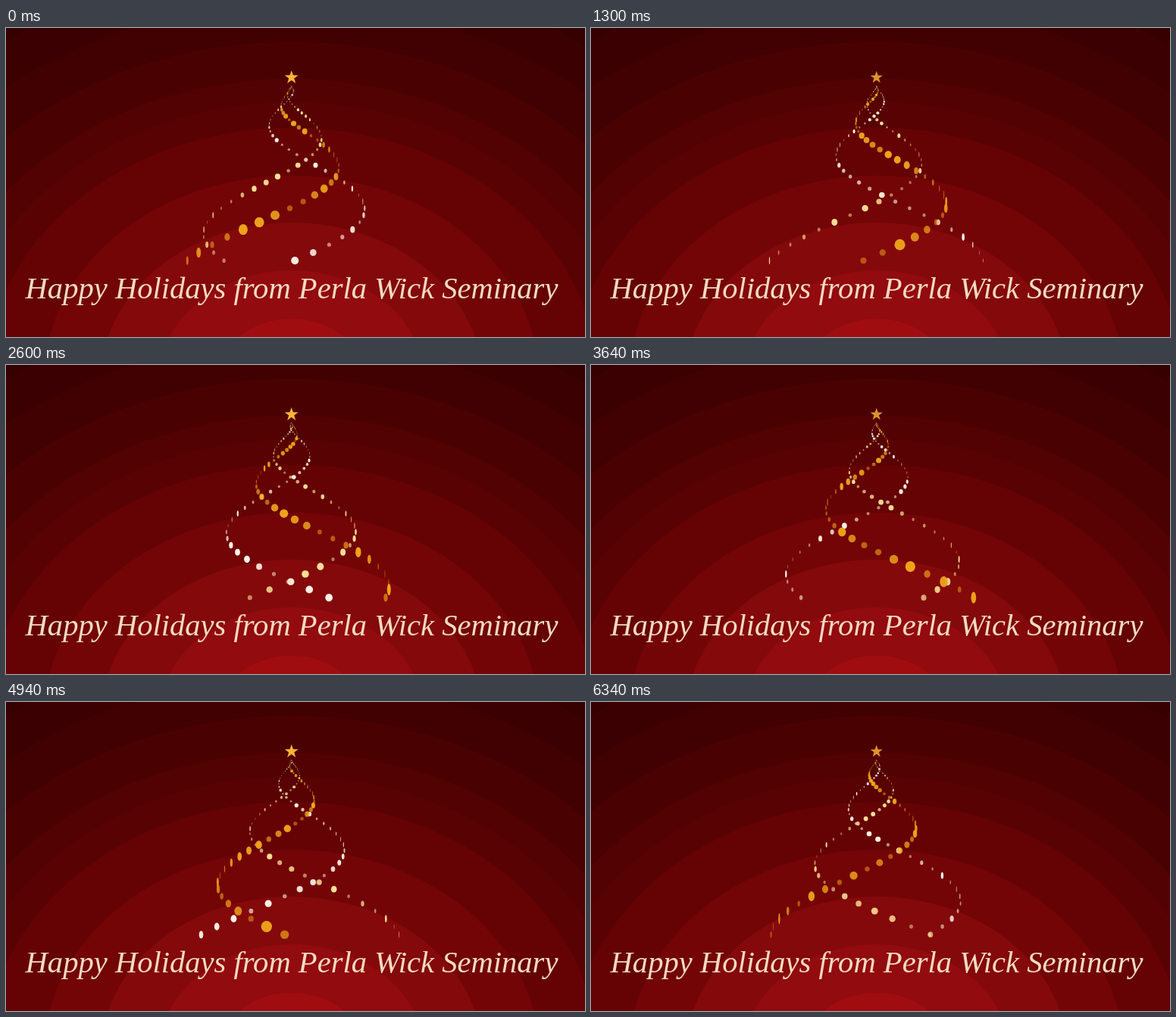
Animation, 764 px wide and 408 px high, one loop 6.44 s. Source, as an HTML page with a canvas:

```html
<!DOCTYPE html>
<html lang="en">
<head>
<meta charset="utf-8">
<title>Happy Holidays</title>
<style>
  html, body { margin: 0; width: 100%; height: 100%; overflow: hidden; background: #360000; }
  svg, canvas { position: absolute; left: 0; top: 0; width: 764px; height: 408px; }
  text { font: italic 40.6px "Liberation Serif", "Times New Roman", serif; fill: #f3dac4; }
</style>
</head>
<body>
<svg viewBox="0 0 764 408">
  <g id="rings"></g>
  <text x="377" y="357" text-anchor="middle">Happy Holidays from Perla Wick Seminary</text>
</svg>
<canvas width="764" height="408"></canvas>
<script>
const LOOP = 6440, STEPS = 55, STEP_SECONDS = 0.1174;
const CENTER = 376.7, TOP = 76, LAST = 43;
const ctx = document.querySelector('canvas').getContext('2d');

// Background glow: vertical radius and colour of each band, outermost first
const bands = [
  [545, '#3b0001'], [497, '#410001'], [447, '#4a0102'], [398, '#520203'], [367, '#590203'],
  [333, '#650304'], [270, '#730506'], [208, '#84090b'], [145, '#920b0e'], [81, '#a00d11']
];
document.getElementById('rings').innerHTML = bands.map(([r, color]) =>
  `<ellipse cx="${CENTER}" cy="465" rx="${r * 1.21}" ry="${r}" fill="${color}"/>`).join('');

// Angles are measured at the lowest dot; each strand turns at its own speed
const strands = [
  { color: '#fff6ea', angle: 3.11, speed: 1.067, size: 0.122 },
  { color: '#f9df96', angle: -0.675, speed: 0.802, size: 0.122 },
  { color: '#eda31c', angle: -1.84, speed: 0.914, size: 0.182 }
];

function random(seed) {
  const v = Math.sin(seed * 127.1 + 3.7) * 43758.5453;
  return v - Math.floor(v);
}

function drawStrand({ color, angle, speed, size }, index, t) {
  ctx.fillStyle = color;
  for (let n = 1; n <= LAST; n++) {
    const k = LAST - n;
    const a = angle - speed * t - 0.18 * k - 0.0004 * k * k;
    const seed = index * 50 + n;
    const glow = 0.5 + 0.5 * Math.sin(random(seed) * 6.283 + t * (2 + 2 * random(seed + 500)));
    const r = n * size * (0.52 + 0.48 * glow);
    ctx.globalAlpha = 0.5 + 0.5 * glow;
    ctx.beginPath();
    ctx.ellipse(CENTER + 0.0771 * n * n * Math.sin(a), TOP + n * n / 8,
      Math.max(0.35, r * Math.abs(Math.cos(a))), r, 0, 0, 7);
    ctx.fill();
  }
}

function drawStar(t) {
  const pulse = 0.5 + 0.9 * Math.cos(2 * Math.PI * (t - 2.53) / 2.82);
  const glow = Math.min(1, Math.max(0, pulse));
  ctx.globalAlpha = 0.82 + 0.18 * glow;
  ctx.fillStyle = '#fdb436';
  ctx.beginPath();
  for (let i = 0; i < 10; i++) {
    const r = (i % 2 ? 3.7 : 9.4) * (0.91 + 0.09 * glow);
    const a = i * Math.PI / 5;
    ctx.lineTo(CENTER + r * Math.sin(a), 65.3 - r * Math.cos(a));
  }
  ctx.fill();
}

const start = performance.now();
function draw() {
  const elapsed = (performance.now() - start) % LOOP;
  const t = Math.floor(elapsed / LOOP * STEPS) * STEP_SECONDS;
  ctx.clearRect(0, 0, 764, 408);
  strands.forEach((strand, i) => drawStrand(strand, i, t));
  drawStar(t);
  requestAnimationFrame(draw);
}
draw();
</script>
</body>
</html>
```
